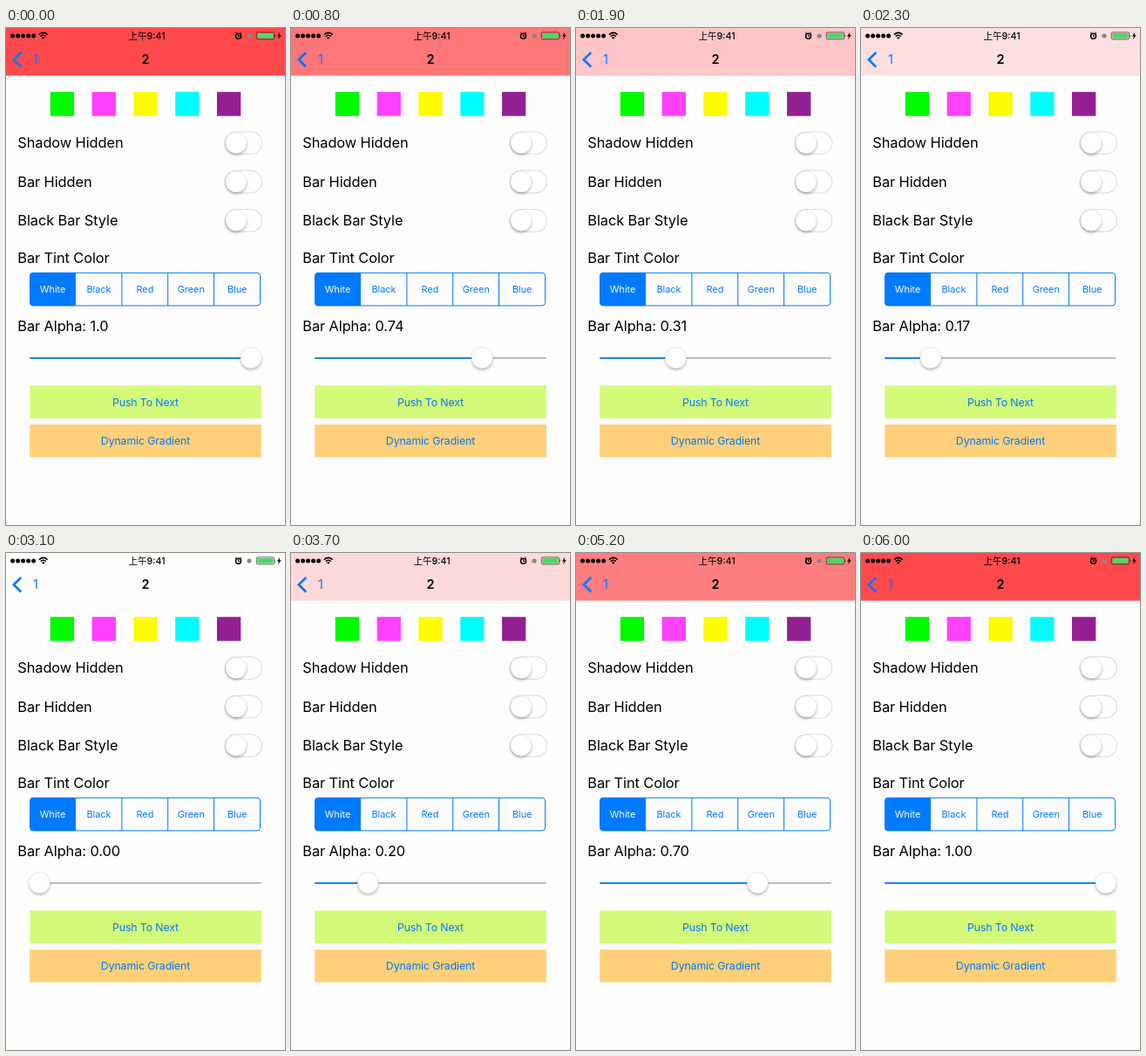
These frames come from a looping animation (320x569 px, 6100 ms). An HTML page:

```html
<!DOCTYPE html>
<html lang="en">
<head>
<meta charset="utf-8">
<title>Navigation bar alpha</title>
<style>
html, body { margin: 0; width: 100%; height: 100%; overflow: hidden; background: #fefdfe; }
svg { display: block; width: 320px; height: 569px; font-family: Inter, "Noto Sans CJK SC", "Noto Sans CJK JP", sans-serif; }
.label { font-size: 16.4px; letter-spacing: -.1px; }
.button { font-size: 12.3px; letter-spacing: -.1px; }
.segment { font-size: 10.9px; }
.mid { text-anchor: middle; }
.blue { fill: #007aff; }
</style>
</head>
<body>
<svg viewBox="0 0 320 569">
  <defs>
    <filter id="shadow" x="-50%" y="-50%" width="200%" height="200%">
      <feDropShadow dx="0" dy="2" stdDeviation="1.6" flood-opacity=".28"/>
    </filter>
    <g id="thumb">
      <circle r="12" fill="#fff" stroke="#000" stroke-opacity=".12" stroke-width=".6" filter="url(#shadow)"/>
    </g>
    <g id="switch">
      <rect x="-13" y="-12.7" width="42.6" height="25.6" rx="12.8" fill="#fff" stroke="#e2e2e2" stroke-width="1.3"/>
      <use href="#thumb"/>
    </g>
  </defs>

  <rect width="320" height="569" fill="#fefdfe"/>
  <rect id="bar" width="320" height="54.6" fill="#ff494c"/>

  <g id="status">
    <g fill="none" stroke="#000" stroke-width="1.5">
      <path d="M38 7.6q4.8-4.4 9.6 0M39.8 9.6q3-2.7 6 0"/>
      <circle cx="266.5" cy="9.2" r="3"/>
      <path d="M266.5 7.4v2h1.5M263 6.3l1.6-1.5M270 6.3l-1.6-1.5" stroke-width="1"/>
    </g>
    <path d="M41 10.9q1.8-1.5 3.6 0l-1.8 1.8z"/>
    <text class="mid" x="161.5" y="12.8" font-size="10.6" font-weight="500">上午9:41</text>
    <circle cx="279" cy="9" r="2.6" fill="#888"/>
    <rect x="287.3" y="4.9" width="20.4" height="8" rx="1.4" fill="none" stroke="#222" stroke-width=".7"/>
    <rect x="288.4" y="6" width="18.2" height="5.8" rx=".5" fill="#4cd964"/>
    <path d="M308.6 7.5q1.3 1.4 0 2.8z"/>
    <path d="M314.2 4.8l-3.2 4.7h2l-.9 3.7 3.6-5h-2.1z"/>
  </g>

  <path d="M17.3 28L8.8 36.2l8.5 8.3" fill="none" stroke="#007aff" stroke-width="2.6"/>
  <text class="blue" x="31" y="41.2" font-size="14.5">1</text>
  <text class="mid" x="160" y="41.2" font-size="14.5" font-weight="600">2</text>

  <g id="swatches"></g>

  <g class="label">
    <text x="13.3" y="137.3">Shadow Hidden</text>
    <text x="13.3" y="181.8">Bar Hidden</text>
    <text x="13.3" y="226.2">Black Bar Style</text>
    <text x="13.3" y="269">Bar Tint Color</text>
    <text x="13.3" y="347.3" id="alpha">Bar Alpha: 1.0</text>
  </g>
  <use href="#switch" x="264" y="131.5"/>
  <use href="#switch" x="264" y="175.9"/>
  <use href="#switch" x="264" y="220.3"/>

  <g id="segments">
    <path class="blue" d="M80 280H31q-3.5 0-3.5 3.5V314.500q0 3.500 3.500 3.500H80z"/>
    <rect x="27.5" y="280.3" width="264" height="37.6" rx="3.5" fill="none" stroke="#007aff"/>
    <path d="M132.900 280v38M185.700 280v38M238.500 280v38" stroke="#007aff"/>
  </g>

  <path d="M27.300 377.900H292.700" stroke="#b5b5b5" stroke-width="1.700"/>
  <path id="track" stroke="#007aff" stroke-width="1.700"/>
  <use id="knob" href="#thumb" y="377.500"/>

  <rect x="27.300" y="409.300" width="265.500" height="37.600" fill="#d3fa79"/>
  <rect x="27.300" y="454" width="265.500" height="37.400" fill="#ffd079"/>
  <g class="button blue mid">
    <text x="160" y="433">Push To Next</text>
    <text x="160" y="477.300">Dynamic Gradient</text>
  </g>
</svg>
<script>
const LOOP = 6100, STEP = 100;
const KEYS = [[200, 1], [1400, .49], [2300, .17], [3000, 0], [3300, 0], [4100, .41], [5200, .7], [6000, 1]];
const get = id => document.getElementById(id);

function add(parent, name, attrs, text = '') {
  const node = document.createElementNS('http://www.w3.org/2000/svg', name);
  for (const key in attrs) node.setAttribute(key, attrs[key]);
  node.textContent = text;
  get(parent).append(node);
}

for (let i = 0; i < 5; i++) add('status', 'circle', { cx: 7.6 + i * 6, cy: 9.1, r: 2.5 });

['#00fa00', '#ff40ff', '#fffb00', '#00fdff', '#932092'].forEach((fill, i) =>
  add('swatches', 'rect', { x: 50.8 + i * 47.8, y: 73.2, width: 27.3, height: 27.5, fill }));

['White', 'Black', 'Red', 'Green', 'Blue'].forEach((name, i) =>
  add('segments', 'text', { class: 'segment mid', x: 53.6 + i * 52.9, y: 303, fill: i ? '#007aff' : '#fff' }, name));

function alphaAt(t) {
  const i = KEYS.findIndex(([time]) => time >= t);
  if (i < 1) return 1;
  const [t0, a] = KEYS[i - 1], [t1, b] = KEYS[i];
  return a + (b - a) * (t - t0) / (t1 - t0);
}

function draw() {
  const t = Math.floor(performance.now() % LOOP / STEP) * STEP;
  const alpha = alphaAt(t), x = 38.6 + alpha * 242.4;
  get('bar').setAttribute('opacity', alpha);
  get('knob').setAttribute('x', x);
  get('track').setAttribute('d', `M27.3 377.9H${x}`);
  get('alpha').textContent = 'Bar Alpha: ' + alpha.toFixed(t < 300 ? 1 : 2);
  requestAnimationFrame(draw);
}
draw();
</script>
</body>
</html>
```
